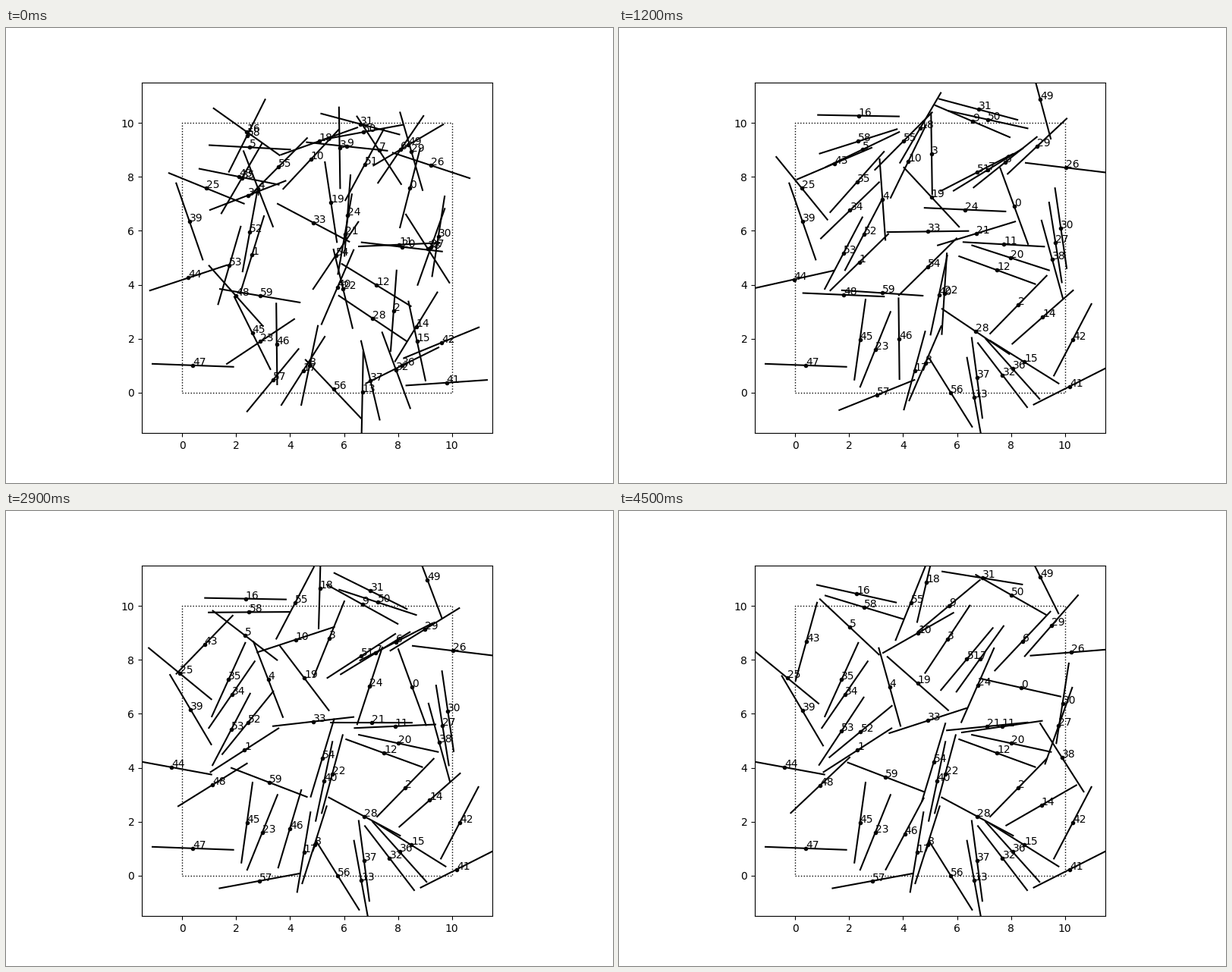
Write a matplotlib script that moves like this. It is 800 px wide and 600 px high and loops after 4600 ms.

```python
import random

import matplotlib.pyplot as plt
import numpy as np
from matplotlib.animation import FuncAnimation

COUNT, HALF, SIDE = 60, 1.5, 10
PUSH, TURN = 0.1, 0.1  # shift and rotation (radians) per crossing
FRAMES, INTERVAL = 46, 100


def cross(a, b):
    return a[..., 0] * b[..., 1] - a[..., 1] * b[..., 0]


def heading(angle):
    return np.stack([np.cos(angle), np.sin(angle)], axis=-1)


def scatter():
    """Random centres in the square and random angles."""
    random.seed(0)
    rows = np.array([[random.random() for _ in range(3)] for _ in range(COUNT)])
    return rows[:, :2] * SIDE, rows[:, 2] * np.pi


def relax(centre, angle):
    """Every crossing pair pushes apart and turns by the sign of its torque."""
    u = heading(angle)
    ui, uj = u[:, None], u[None, :]
    gap = centre[None, :] - centre[:, None]
    with np.errstate(divide="ignore", invalid="ignore"):
        s = cross(gap, uj) / cross(ui, uj)
        t = cross(gap, ui) / cross(ui, uj)
        away = -gap / np.linalg.norm(gap, axis=-1, keepdims=True)
        spin = np.sign(s * cross(ui, away))
    hit = (np.abs(s) <= HALF) & (np.abs(t) <= HALF)
    np.fill_diagonal(hit, False)
    shift = np.where(hit[..., None], away, 0).sum(axis=1)
    turn = np.where(hit, spin, 0).sum(axis=1)
    return centre + PUSH * shift, angle + TURN * turn


poses = [scatter()]
while len(poses) < FRAMES:
    poses.append(relax(*poses[-1]))

fig, ax = plt.subplots(figsize=(8, 6), dpi=100)
ax.set_aspect("equal")
ax.set_xlim(-1.5, 11.5)
ax.set_ylim(-1.5, 11.5)
ax.plot([0, SIDE, SIDE, 0, 0], [0, 0, SIDE, SIDE, 0], "k:", lw=1)

needles = [ax.plot([], [], "k-", lw=1.5)[0] for _ in range(COUNT)]
dots = [ax.plot([], [], "k.")[0] for _ in range(COUNT)]
labels = [ax.text(0, 0, str(n)) for n in range(COUNT)]


def draw(step):
    centre, angle = poses[step]
    arm = HALF * heading(angle)
    for n, (x, y) in enumerate(centre):
        dx, dy = arm[n]
        needles[n].set_data([x - dx, x + dx], [y - dy, y + dy])
        dots[n].set_data([x], [y])
        labels[n].set_position((x, y))
    return needles + dots + labels


anim = FuncAnimation(fig, draw, frames=FRAMES, interval=INTERVAL,
                     repeat=True, repeat_delay=0)
plt.show()
```
